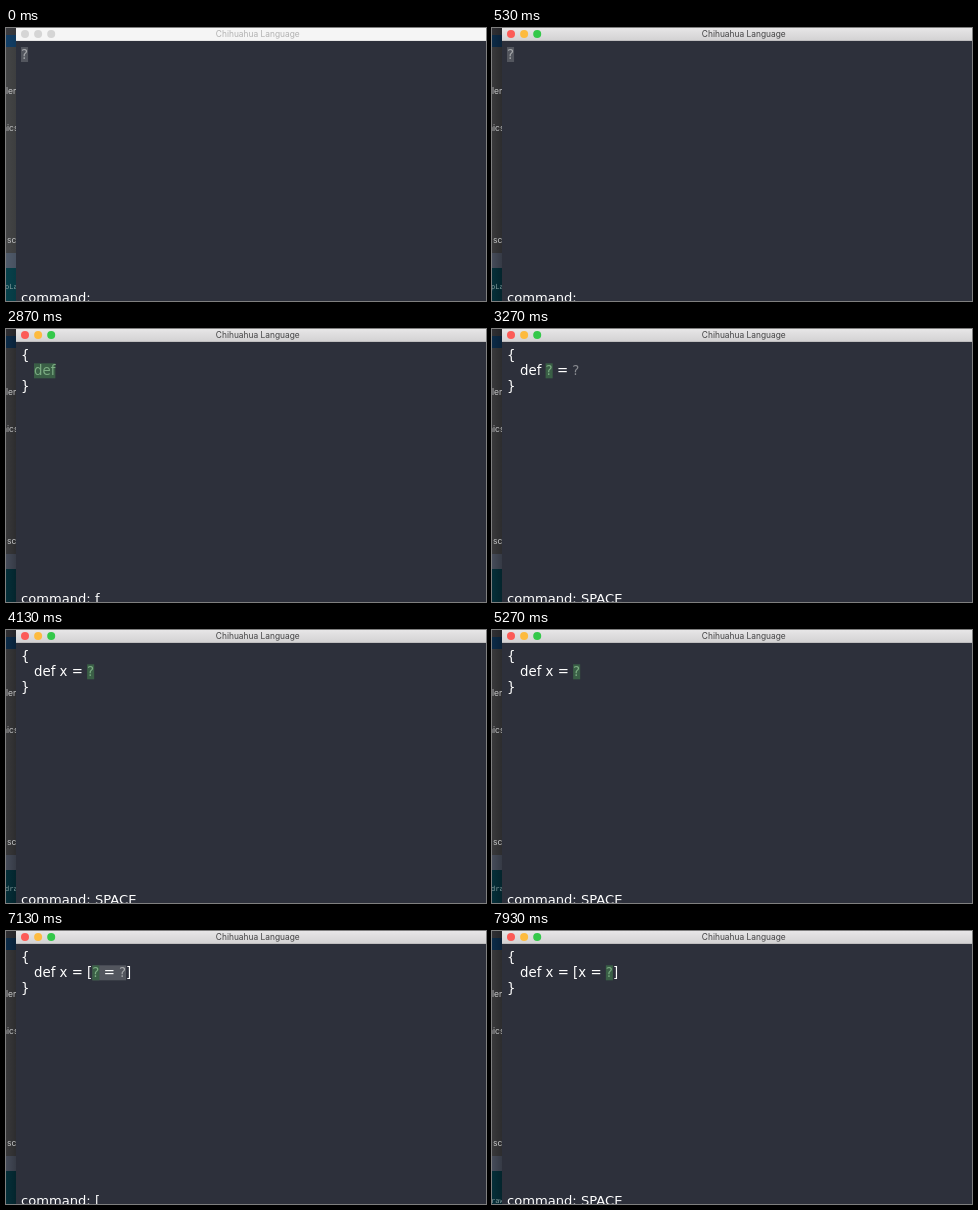
Recreate the animation shown at these times as an HTML page with a canvas. Size 480 by 273 pixels, loop 8000 ms.

```html
<!DOCTYPE html>
<html lang="en">
<head>
<meta charset="utf-8">
<title>Chihuahua Language</title>
<style>
  html, body { margin: 0; width: 100%; height: 100%; overflow: hidden; background: #2d303b; }
  canvas { display: block; width: 480px; height: 273px; }
</style>
</head>
<body>
<canvas id="stage" width="480" height="273"></canvas>
<script>
const ctx = document.getElementById('stage').getContext('2d');
const LOOP = 8000, ACTIVATE = 270;
const EDITOR_LEFT = 15, INDENT = 28, LINE_HEIGHT = 15.3;
const CODE_FONT = '13.33px "DejaVu Sans", sans-serif';
const COMMAND_FONT = '13.1px "DejaVu Sans", sans-serif';
const UI_FONT = 'Inter, sans-serif';

// Markup: <text> is the insertion point, «text» a selected group, ? an empty slot.
const block = body => ['{', body, '}'];
const keystrokes = [
  [0, '', ['«?»']],
  [1330, 'i', ['<?>']],
  [2270, '{', block('<?>')],
  [2530, 'd', block('<d>')],
  [2670, 'e', block('<de>')],
  [2870, 'f', block('<def>')],
  [3000, 'SPACE', block('def <?> = ?')],
  [3400, 'x', block('def <x> = ?')],
  [3530, 'SPACE', block('def x = <?>')],
  [5600, 'p', block('def x = <p>')],
  [6270, '', block('def x = <?>')],
  [6530, '[', block('def x = [«<?> = ?»]')],
  [7600, 'x', block('def x = [<x> = ?]')],
  [7800, 'SPACE', block('def x = [x = <?>]')],
];

// Terminal output glimpsed beside the window: [time, [text, baseline], ...]
const terminal = [
  [0, ['oLa', 261]],
  [270, ['pLa', 261]],
  [2270],
  [3400, ['dra', 261]],
  [5600, ['dra', 250], ['dra', 272]],
  [6270],
  [7600, ['raw', 272]],
];

const latest = (list, time) => list.filter(entry => entry[0] <= time).pop();

function rect(x, y, w, h, fill) {
  ctx.fillStyle = fill;
  ctx.fillRect(x, y, w, h);
}

function text(value, x, y, font, fill, align = 'left') {
  ctx.font = font;
  ctx.fillStyle = fill;
  ctx.textAlign = align;
  ctx.fillText(value, x, y);
}

function gradient(x, y, ...colors) {
  const fill = ctx.createLinearGradient(0, 0, x, y);
  colors.forEach((color, i) => fill.addColorStop(i / (colors.length - 1), color));
  return fill;
}

function drawDesktop(active, time) {
  const bands = active
    ? [[0, '#303034'], [7, '#0c2b48'], [19, '#39393b'], [225, '#454b59'], [240, '#052f39']]
    : [[0, '#3b3c40'], [7, '#123f67'], [19, '#444546'], [225, '#505b6b'], [240, '#07414b']];
  bands.forEach(([y, color]) => rect(0, y, 10, 273 - y, color));
  rect(0, 0, 10, 273, gradient(10, 0, 'rgba(0,0,0,0)', `rgba(0,0,0,${active ? 0.22 : 0.1})`));

  [['ler', 0, 66], ['nics', -4, 103], ['sc', 1, 215]].forEach(([label, x, y]) =>
    text(label, x, y, '8.5px ' + UI_FONT, '#c4c5c6'));
  latest(terminal, time).slice(1).forEach(([label, y]) =>
    text(label, -1, y, '7px "DejaVu Sans Mono", monospace', '#829b9c'));
}

function drawWindow(active) {
  rect(10, 0, 470, 273, '#2d303b');
  rect(10, 0, 470, 13, active ? gradient(0, 13, '#e7e6e7', '#d2d1d2') : '#f5f5f5');
  rect(10, 12.5, 470, 0.5, active ? '#aaa9ab' : '#d4d4d5');
  ['#fc5b57', '#fdbb3f', '#34c84a'].forEach((color, i) => {
    ctx.fillStyle = active ? color : '#d5d5d5';
    ctx.beginPath();
    ctx.arc(19 + 13.1 * i, 6, 4, 0, 2 * Math.PI);
    ctx.fill();
  });
  text('Chihuahua Language', 251.8, 9.2, '8.4px ' + UI_FONT, active ? '#434344' : '#b1b1b1', 'center');
}

function drawLine(markup, x, baseline) {
  ctx.font = CODE_FONT;
  const width = value => ctx.measureText(value.replace(/[<>«»]/g, '')).width;
  const [before, group] = markup.split(/[«»]/);
  if (group) rect(x + width(before), baseline - 12, width(group), 15, '#53565e');

  for (const part of markup.replace(/[«»]/g, '').split(/(<[^>]*>|\?)/)) {
    const focused = part.startsWith('<');
    const value = part.replace(/[<>]/g, '');
    const partWidth = width(value);
    if (focused) rect(x, baseline - 12, partWidth, 15, '#3a5f46');
    const color = focused ? '#7bac82' : value === '?' ? (group ? '#a5a7aa' : '#888a8f') : '#fff';
    text(value, x, baseline, CODE_FONT, color);
    x += partWidth;
  }
}

function draw(now) {
  const time = now % LOOP;
  const active = time >= ACTIVATE;
  const [, key, lines] = latest(keystrokes, time);
  drawDesktop(active, time);
  drawWindow(active);
  lines.forEach((line, i) =>
    drawLine(line, i === 1 ? INDENT : EDITOR_LEFT, 31 + i * LINE_HEIGHT));
  text('command: ' + key, EDITOR_LEFT, 273.5, COMMAND_FONT, '#fff');
}

const start = performance.now();
function tick() {
  draw(performance.now() - start);
  requestAnimationFrame(tick);
}
tick();
</script>
</body>
</html>
```
